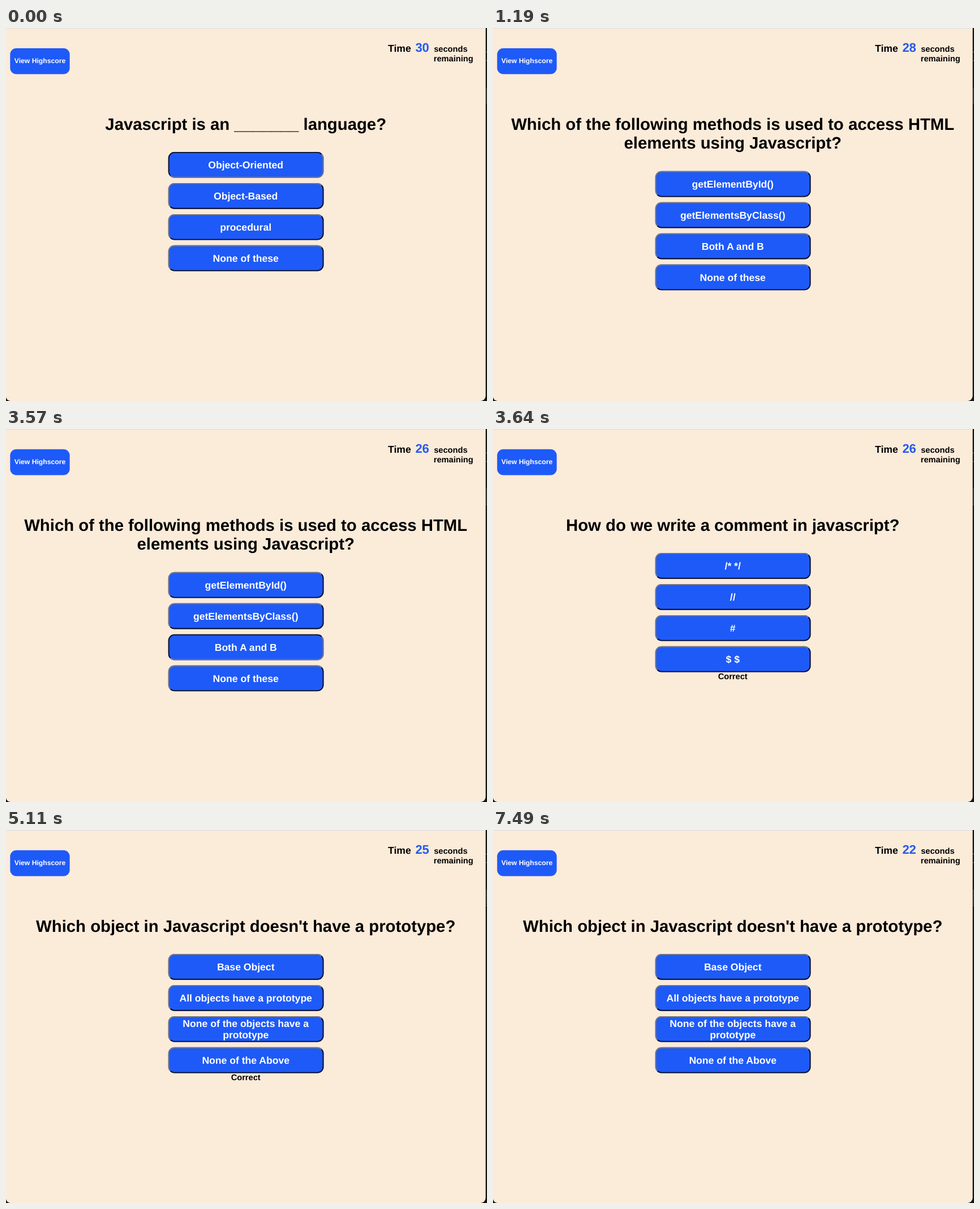
Recreate the animation shown at these times as an HTML page. Size 850 px wide and 659 px high, loop 8 s.

```html
<!DOCTYPE html>
<html lang="en">
<head>
<meta charset="utf-8">
<title>Quiz</title>
<style>
  html, body { margin: 0; width: 100%; height: 100%; overflow: hidden; background: #fbebd9; }
  svg { display: block; width: 100vw; height: 100vh; }
  text { font: bold 14.65px "Liberation Sans", Helvetica, Arial, sans-serif; text-rendering: geometricPrecision; }
  .mid { text-anchor: middle; }
  .title { font-size: 29.3px; }
  .option { font-size: 17.58px; fill: #fff; }
</style>
</head>
<body>
<svg viewBox="0 0 850 659" xmlns="http://www.w3.org/2000/svg">
  <rect width="850" height="659" fill="#151413"/>
  <path d="M0 0H847.6V650a9 9 0 0 1-9 9H8a9 9 0 0 1-8-7Z" fill="#fbebd9"/>
  <rect width="847.6" height="1" fill="#dcdbdf"/>
  <path d="M848 42.5h2M848 57.5h2" stroke="#77736e"/>
  <path d="M849 106v28" stroke="#66625e" stroke-width="2" stroke-dasharray="1 2"/>
  <rect x="7.3" y="35.8" width="105.3" height="45.7" rx="11" fill="#1e5af8"/>
  <text class="mid" x="60" y="62.3" fill="#fff" style="font-size:12.2px">View Highscore</text>
  <text x="675" y="42.2" style="font-size:17.58px">Time</text>
  <text id="clock" x="723.4" y="42.3" fill="#2459ee" style="font-size:21.97px"></text>
  <text x="756.2" y="42.2">seconds</text>
  <text x="755.7" y="59">remaining</text>
  <g id="quiz"></g>
</svg>
<script>
const LOOP = 8000, CENTER = 423.7;
const BTN = { x: 286.7, w: 274.7, h: 45.7, pitch: 54.94, r: 11 };

// start: time the question appears; press: time and index of the clicked answer
const questions = [
  { start: 0, press: [0, 0], title: ['Javascript is an _______ language?'],
    options: ['Object-Oriented', 'Object-Based', 'procedural', 'None of these'] },
  { start: 140, press: [3570, 2],
    title: ['Which of the following methods is used to access HTML', 'elements using Javascript?'],
    options: ['getElementById()', 'getElementsByClass()', 'Both A and B', 'None of these'] },
  { start: 3640, press: [5040, 1], title: ['How do we write a comment in javascript?'],
    options: ['/* */', '//', '#', '$ $'] },
  { start: 5110, press: [LOOP, 0], title: ["Which object in Javascript doesn't have a prototype?"],
    options: ['Base Object', 'All objects have a prototype',
      'None of the objects have a|prototype', 'None of the Above'] }
];
const ticks = [140, 1190, 2240, 3220, 4340, 5390, 6440, 7490];
const feedback = [[140, 1190], [3640, 4690], [5110, 6160]];

const quiz = document.getElementById('quiz');
const clock = document.getElementById('clock');

const label = (text, y, cls = '') =>
  `<text class="mid ${cls}" x="${CENTER}" y="${y}">${text}</text>`;

// Bevelled border: one stroke for top and left, one for bottom and right
function button(text, y, pressed) {
  const { x, w, h, r } = BTN;
  const i = 0.92, a = r - i, k = a * (1 - Math.SQRT1_2);
  const l = x + i, t = y + i, R = x + w - i, b = y + h - i;
  const arc = (px, py) => `A${a} ${a} 0 0 1 ${px} ${py}`;
  const topLeft = `M${l + k} ${b - k}${arc(l, b - a)}V${t + a}${arc(l + a, t)}H${R - a}${arc(R - k, t + k)}`;
  const bottomRight = `M${R - k} ${t + k}${arc(R, t + a)}V${b - a}${arc(R - a, b)}H${l + a}${arc(l + k, b - k)}`;
  const edge = (d, dark) =>
    `<path d="${d}" fill="none" stroke="${dark ? '#0b0e20' : '#74757c'}" stroke-width="1.83"/>`;
  const lines = text.split('|');
  const base = y + 29 - (lines.length - 1) * 10.1;
  return `<rect x="${x}" y="${y}" width="${w}" height="${h}" rx="${r}" fill="#1e5af8"/>` +
    edge(topLeft, pressed) + edge(bottomRight, !pressed) +
    lines.map((s, n) => label(s, base + n * 20.2, 'option')).join('');
}

function render(t) {
  const q = questions.filter(item => item.start <= t).pop();
  const drop = (q.title.length - 1) * 33.8;
  const [pressTime, pressIndex] = q.press;
  let out = q.title.map((s, n) => label(s, 179.6 + n * 33.8, 'title')).join('');
  q.options.forEach((s, n) => {
    out += button(s, 219 + drop + n * BTN.pitch, t >= pressTime && n === pressIndex);
  });
  if (feedback.some(([from, to]) => t >= from && t < to)) out += label('Correct', 442.2 + drop);
  return out;
}

let shown = '';
function frame() {
  const t = performance.now() % LOOP;
  const seconds = 30 - ticks.filter(k => k <= t).length;
  const markup = render(t);
  if (markup !== shown) quiz.innerHTML = shown = markup;
  clock.textContent = seconds;
  requestAnimationFrame(frame);
}
frame();
</script>
</body>
</html>
```
